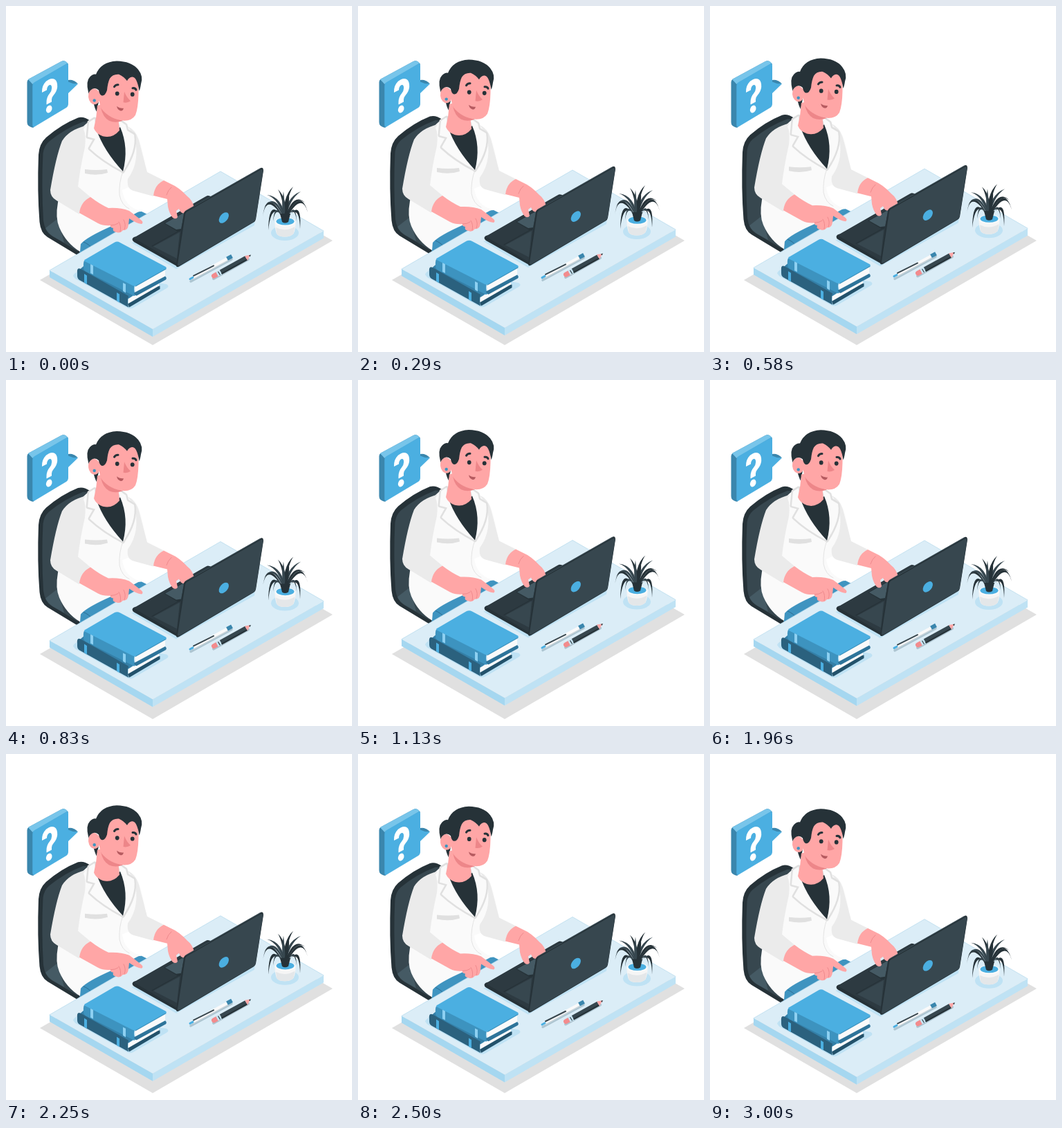
Write an HTML page with a canvas that moves like this. It is 500 by 500 pixels and loops after 3040 ms.

```html
<!DOCTYPE html>
<html lang="en">
<head>
<meta charset="utf-8">
<title>At the desk</title>
<style>
html, body { margin: 0; width: 100%; height: 100%; overflow: hidden; background: #fff; }
canvas { display: block; width: 500px; height: 500px; }
</style>
</head>
<body>
<canvas id="stage"></canvas>
<script>
const LOOP = 3040, LIFT = 10;
const BLUE = '#4bafe1', DARK = '#263238', SLATE = '#37474f', STEEL = '#455a64';
const SKIN = '#ffa6a6', BLUSH = '#ed8689', COAT = '#fafafa', FOLD = '#ebebeb', SEAM = '#e0e0e0';
const TOP = '#dbedf7', TINT = '#bfe2f4';

const canvas = document.getElementById('stage');
const ctx = canvas.getContext('2d');
const dpr = window.devicePixelRatio || 1;
canvas.width = canvas.height = 500 * dpr;

function fill(color, d) {
  ctx.fillStyle = color;
  ctx.fill(new Path2D(d));
}

function line(color, width, d, cap = 'round') {
  ctx.strokeStyle = color;
  ctx.lineWidth = width;
  ctx.lineCap = cap;
  ctx.lineJoin = 'round';
  ctx.stroke(new Path2D(d));
}

function oval(color, x, y, rx, ry = rx, turn = 0) {
  ctx.fillStyle = color;
  ctx.beginPath();
  ctx.ellipse(x, y, rx, ry, turn, 0, Math.PI * 2);
  ctx.fill();
}

function bubble() {
  fill('#3a86ad', 'M90 107 Q98 106 104 112.5 L90 114Z');
  fill(BLUE, 'M90 109.5 Q97 113 104 112.5 L90 126Z');
  fill('#3a86ad', 'M30.5 110 Q30.5 107 33 105.5 L80 80 Q83 78.5 86 80 L90 84 L40 175.5 Q37 176 35 174.5 L32.5 173 Q30.5 171.5 30.5 168Z');
  fill('#78c5ea', 'M32 106 L80 80 Q83 78.3 86 80 L89.5 82.5 L40 111.5 L38.4 113Z');
  fill(BLUE, 'M38.3 116 Q38.3 112 41 110.3 L86.5 84 Q90 82 90 86 V141 Q90 145 87 147 L42 174 Q38.3 176.5 38.3 172Z');
  fill('#fff', 'M52 125 Q51.5 115 58 108.8 Q65 103 70.5 106 Q74.7 109 74.2 117 Q73.5 123.5 69 128.5 Q66 132 66 135 V138.5 L58.5 142.5 V139.5 Q58.5 131.5 63 126.5 Q66.2 122.5 66.2 118.5 Q66 112.6 62.5 114.3 Q59 116.5 59 121.5Z');
  oval('#fff', 62.2, 149, 4, 5.7, 0.4);
}

function chair() {
  fill(DARK, 'M108 363 L60 334 Q50 328 48.5 312 Q45 268 47 215 Q48 199 58 190 Q80 171 104 161.5 Q112 159 122 166 V200 L112 365Z');
  fill(SLATE, 'M103 354 L66 332 Q56 326 54 310 Q51 260 53.5 213 Q55 202 62 196 Q85 177 112 167 L121 168 V350Z');
  fill(STEEL, 'M57 321 L75 307 L84 342 L68 333 Q60 328 57 321Z');
}

function body() {
  fill('#3f94c0', 'M106 361 L108 340 L150 308 Q184 297 196 297 L204 301 L120 362Z');
  line('#2c6d92', 1, 'M112 341 Q120 344 125 351');
  fill(COAT, 'M126 162 L116 170 Q92 190 84 230 L75 284 Q71 306 77 320 Q87 343 107 355 L108 344 Q116 334 155 317 L194 296 Q171 290 168 266 L204 250 Q200 215 192 192 Q187 179 176 174 L163 166Z');
  fill(FOLD, 'M115 173 Q91 179 81 195 Q72 218 64 266 Q64 276 73 281 L106 301 Q108 284 122 276 L104 261 Q107 235 114 204 Q116 186 112 178Z');
  fill(FOLD, 'M176 174 Q187 179 192 194 L204 240 L228 252 Q215 259 213 275 L184 267 Q174 264 176 250 Q195 224 185 187Z');
  line(SEAM, 0.9, 'M169 239 Q163 255 164 273 Q167 288 178 293');
  fill(SEAM, 'M114 236 Q130 238 146 236 L147 241 Q131 246 114 242Z');

  const lapels = [
    'M128 163 L120 168 L118 189 L129 192 L121 206 Q140 224 169 239 Q143 208 130 177Z',
    'M162 164 L173 172 L175 180 L185 186 Q189 209 169 239 Q176 205 165 176Z'
  ];
  lapels.forEach(d => line(SEAM, 5, d));
  lapels.forEach(d => fill(COAT, d));
  fill(DARK, 'M130.5 178 Q146 192 165 175 Q178 205 169 239 Q141 209 130.5 178Z');
}

function head() {
  ctx.save();
  ctx.translate(0, 0.7);
  fill(DARK, 'M126 137 H134 L131 152 Q128 147 126 137Z');
  fill(SKIN, 'M132 143 Q131 160 127 176 Q130 184 140 187.5 Q154 191 164 179 L162 160 L146 140Z');
  fill(BLUSH, 'M137 146 Q147 159 169 165 Q158 169 149 165 Q140 160 137 146Z');
  fill(SKIN, 'M134 118 L144 98 Q165 88 189 100 Q192 110 191.5 126 Q191 147 187 157 Q182 165 171 165 Q150 163 138 148 Q133 138 134 118Z');
  oval(SKIN, 127.5, 130, 8.5, 11.5, -0.1);
  fill(DARK, 'M119 124 Q115 108 121 102 Q126 97 130 98 Q137 80 160 78.7 Q181 79 191 91 Q199 101 195 112 Q194 119 192.5 122 Q191 112 188 106 Q185 101 181 102 Q177 103 175 107.5 Q170 101 163 98 Q154 97.5 150 104 Q147 110 146 121 Q143 130 138 128.5 Q135 127 134 121 Q130 117 125 119 Q121 121 119 126Z');
  oval('#3f94c0', 127.7, 135.8, 2.2);
  oval(DARK, 160.7, 125.8, 2.9, 3.1);
  oval(DARK, 182.7, 127, 2.9, 3.1);
  line(DARK, 3, 'M156.5 116 Q158 113 162 113');
  line(DARK, 3, 'M183 118 Q187 117.5 188 120.5');
  fill(BLUSH, 'M171 123 Q174 131 180 136.5 Q175 140 169.5 138.5Z');
  fill('#b65b60', 'M160 144 Q164 147.5 170 147 Q169 151.5 165 150.5 Q161 149 160 144Z');
  ctx.restore();
}

function desk() {
  fill(TOP, 'M63 382 L310 239 L459 325 L212 467Z');
  line('#b9dcee', 0.8, 'M63 382 L310 239 L459 325');
  fill('#a5d7f0', 'M63 382 L212 467 V478 L63 392Z');
  fill(TINT, 'M212 467 L459 325 V335.5 L212 478Z');
  fill(TINT, 'M97 390 Q98 386 106 383 L232 402 Q237 405 232 408 L184 436 Q179 439 173 435 L100 394Z');
  fill(TINT, 'M181 342 L246 380 L359 317 L360 306 L240 330Z');
  oval(TINT, 403, 328, 20, 11);
}

function books() {
  fill('#347fa7', 'M104 383 L112 376 L187 416 L177 423Z');
  fill('#2b617e', 'M103 386 Q102 377 108 380 L177 419 Q175 427 177 435.5 L108 397 Q103 395 103 390Z');
  fill('#fafafa', 'M177 423 L221 399 V405 L177 430Z');
  fill('#23526b', 'M176 430.5 L220 405 L222.5 404.5 V409 L178 435.5Z');
  fill(BLUE, 'M113 387 L117 389.5 V402 L113 399.5Z M160 414 L164 416.5 V428.5 L160 426Z');

  fill('#3d93bf', 'M113 368 Q111 372 112.5 381 L115 383.5 L185 419 Q188 419 185.5 413 Q184 407 187 402Z');
  fill('#fafafa', 'M186 404 L230 381 V391 L187 415Z');
  fill(BLUE, 'M114 369 Q112 367 115 366 L157 341.5 Q161 339.5 165 342 L231 377 Q233 379 230 380.5 L190 403.5 Q186 405.5 183 404Z');
  line('#3d93bf', 1.2, 'M187 405 L231 380');
  fill('#2e749a', 'M185 414.5 L230 390.5 Q233 393 231 395.5 L189 418.5 Q186 419 185 414.5Z');
  fill('#8dd0f1', 'M122 373 L126 375 V388 L122 386Z M169 400 L173 402 V414.5 L169 412Z');
}

function pens() {
  line('#adc5d1', 3.5, 'M267 398 L326 366');
  line('#fafafa', 5, 'M270 392.5 L321 365', 'butt');
  line('#c9d4da', 1.4, 'M271 394.5 L322 367', 'butt');
  line(SLATE, 2, 'M271 389.8 L300 375.3');
  line('#3a86ad', 5.8, 'M319.5 365.3 L326.5 361.5', 'butt');
  line(BLUE, 3, 'M266 394.5 L270 392.3');

  line('#adc5d1', 4, 'M300 394 L350 366');
  line('#f28b8d', 7, 'M300.5 390 L306 387');
  line('#c8e5f4', 7.2, 'M305 387.6 L311 384.3', 'butt');
  line(SLATE, 1.2, 'M306.5 383.8 L309.5 388.8', 'butt');
  line(SLATE, 7, 'M310.5 384.5 L347 364.4', 'butt');
  line(DARK, 2, 'M311.5 387 L348.5 366.5', 'butt');
  fill(SKIN, 'M345.2 361 L353 359.8 L349 367.7Z');
  fill(DARK, 'M351 360.2 L354 359.5 L352.5 362.5Z');
}

function leaf(tipX, tipY, bendX, bendY, width, color) {
  const a = Math.atan2(tipY - 307, tipX - 403) + Math.PI / 2;
  const dx = Math.cos(a) * width, dy = Math.sin(a) * width;
  ctx.fillStyle = color;
  ctx.beginPath();
  ctx.moveTo(403 - dx / 2, 310);
  ctx.quadraticCurveTo(bendX - dx, bendY - dy, tipX, tipY);
  ctx.quadraticCurveTo(bendX + dx, bendY + dy, 403 + dx / 2, 310);
  ctx.fill();
}

function plant() {
  fill('#f5f5f5', 'M388.5 312 H418.5 Q418.5 323 415.5 329 Q411 333.5 403 333.5 Q394 333.5 391 329 Q388.5 322 388.5 312Z');
  fill('#e4e7e9', 'M390 320 Q403 327 417.5 319 L415.5 329 Q411 333.5 403 333.5 Q394 333.5 391 329Z');
  oval('#fafafa', 403.5, 312, 15, 6.6);
  oval(BLUE, 403.5, 311.3, 13, 5.3);
  const blades = [
    [377, 273, 398, 277, 3, SLATE], [393, 265, 404, 278, 2.8, DARK],
    [415, 261, 402, 276, 3, DARK], [426, 268, 406, 278, 3, SLATE],
    [371, 304, 377, 263, 3.6, DARK], [436, 298, 426, 263, 3.6, DARK],
    [379, 324, 382, 275, 3.6, DARK], [425, 322, 426, 277, 3.6, DARK],
    [372, 292, 388, 268, 3, SLATE], [432, 284, 416, 270, 3, DARK],
    [386, 311, 389, 282, 3, SLATE], [420, 311, 418, 281, 3, SLATE],
    [401, 268, 400, 286, 3, SLATE], [409, 270, 407, 287, 3, DARK]
  ];
  blades.forEach(b => leaf(...b));
  fill(DARK, 'M396 300 L411 300 L408 312 Q403 315 399 312Z');
}

function leftHand() {
  fill(SKIN, 'M122 276 Q108 283 106 299 L133 314 Q141 318 151 317 Q150 320 155 321 Q153 326 160 327 Q165 329 169 324 Q176 325 177 316 L178 307 Q188 314 196 315 Q199 313 196 310 Q185 301 178 296 Q165 291 148 292 Q135 286 122 276Z');
  line(BLUSH, 0.9, 'M151 317 Q158 317 162 314');
  line(BLUSH, 0.9, 'M163 312 Q167 318 165 326');
  line(BLUSH, 0.9, 'M170 309 Q174 316 171 323');
}

function laptop() {
  fill(DARK, 'M182.5 337 Q183 334 188 333 L290 274.5 Q293 273 299 277 L258 330 L247 376 L185 341 Q182.5 339.5 182.5 337Z');
  fill('#2d3a41', 'M185 335.5 L288 276 Q291 274.5 298 278 L256 310 L247 372Z');
  fill(DARK, 'M228 314 L284 282 L294 287 L257 308 L252 326 L248 326Z');
  fill(STEEL, 'M230 314 L284 283.5 L290 287 L256 307 L253 322 L246 323Z');
  line(DARK, 1.2, 'M211 347 L252 324');
  fill(SLATE, 'M213 347.5 L251 327 L247 365Z');
}

function rightHand() {
  fill(SKIN, 'M228 252 Q215 258 213 274 L233 279 L234 290 Q236 300 241 306 Q246 309 248 305 L246 296 L250 293 Q253 301 258 299 L272 292 Q270 281 262 275 Q250 262 238 257Z');
  line(BLUSH, 0.9, 'M239 262 Q234 266 232 273');
}

function screen() {
  fill(DARK, 'M257 299 Q258 296.5 260 295.5 L367 234.5 Q372 232 372 238 L361 308 Q360.5 311 358 312.5 L250 376.5 Q245.5 378.5 246 374Z');
  fill(SLATE, 'M259 301 Q259.5 298.5 262 297 L367.5 237 Q372 235 371.5 239 L360.7 307.5 Q360 310.5 357.5 312 L251.5 374.5 Q247.5 376.5 248 373Z');
  line(STEEL, 0.8, 'M260 296 L368 234.7');
  oval(BLUE, 314.8, 306, 9, 5.6, -0.88);
}

const group = [chair, body, head, desk, laptop, rightHand, screen, leftHand, books, pens, plant];

function draw(now) {
  const phase = now % LOOP / LOOP;
  const lift = LIFT * (1 - Math.abs(1 - 2 * phase));
  ctx.setTransform(dpr, 0, 0, dpr, 0, 0);
  fill('#fff', 'M0 0 H500 V500 H0Z');
  fill('#e0e0e0', 'M49 396 L309 245.5 L472 339 L212 490Z');
  bubble();
  ctx.translate(0, -lift);
  group.forEach(part => part());
}

const start = performance.now();
function tick() {
  draw(performance.now() - start);
  requestAnimationFrame(tick);
}
tick();
</script>
</body>
</html>
```
